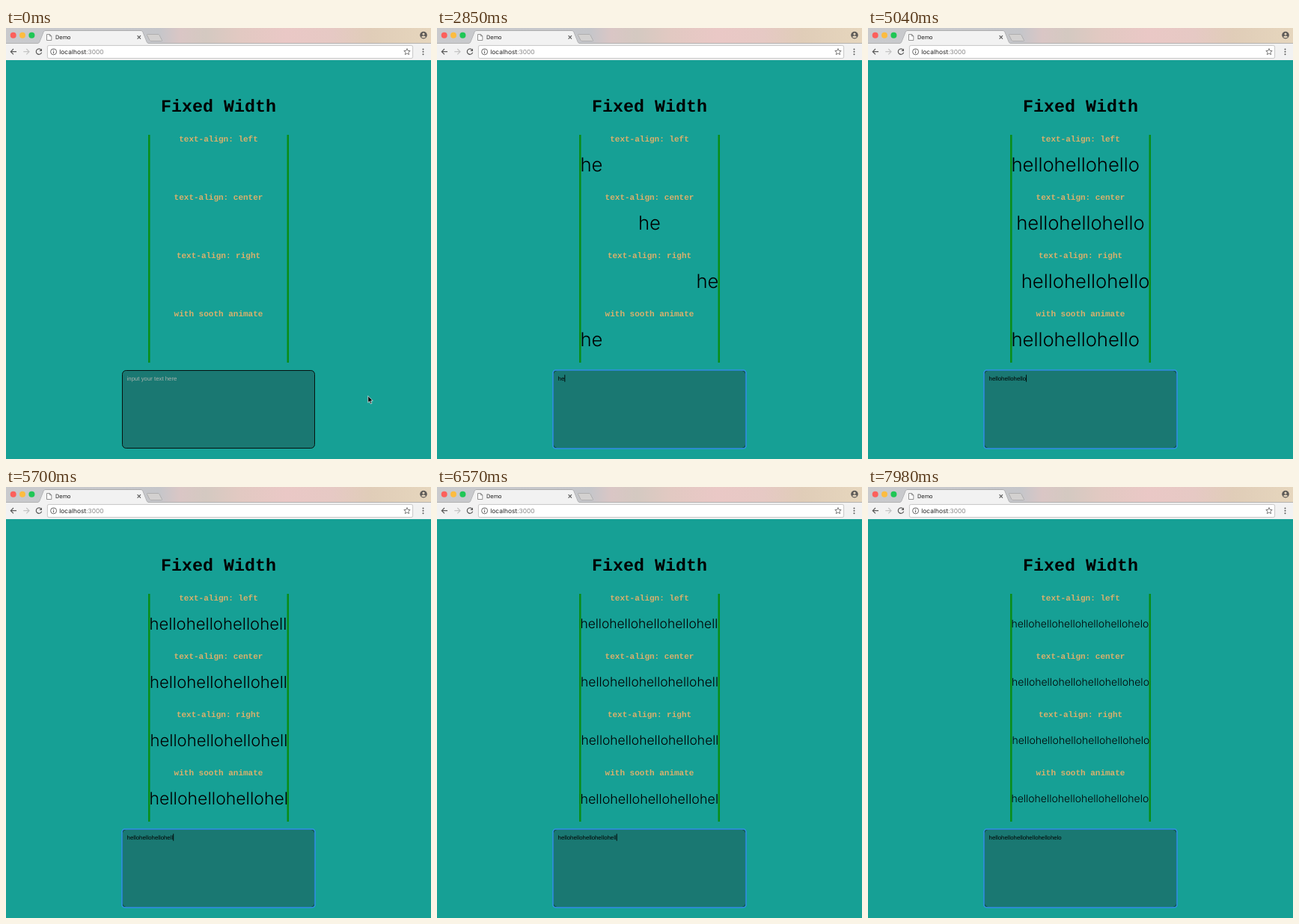
An HTML page for the animation above (8000 ms loop, 568 by 577 pixels).

```html
<!DOCTYPE html>
<html lang="en">
<head>
<meta charset="utf-8">
<title>Demo</title>
<style>
  html, body { margin: 0; width: 100%; height: 100%; overflow: hidden; background: #16a095; }
  svg { display: block; width: 568px; height: 577px; text-rendering: geometricPrecision; }
  .ui { font-family: Inter, Roboto, sans-serif; }
  .mono { font-family: "Liberation Mono", "DejaVu Sans Mono", monospace; font-weight: 700; text-anchor: middle; }
  .label { font-size: 11px; fill: #dab06c; }
  .big { font-family: Inter, Lato, sans-serif; font-weight: 300; }
  .area { font: 7.8px "Liberation Sans", Arial, sans-serif; }
  .icon { fill: none; stroke: #5b5b5b; stroke-width: 1.2; }
</style>
</head>
<body>
<svg viewBox="0 0 568 577">
  <defs>
    <linearGradient id="bar">
      <stop offset="0" stop-color="#c9cacd"/>
      <stop offset=".36" stop-color="#c5c6ca"/>
      <stop offset=".41" stop-color="#dac6c5"/>
      <stop offset=".47" stop-color="#d4c9c1"/>
      <stop offset=".55" stop-color="#e2c9c2"/>
      <stop offset=".66" stop-color="#eac8c6"/>
      <stop offset=".77" stop-color="#e6c9c4"/>
      <stop offset=".86" stop-color="#e0cdb8"/>
      <stop offset="1" stop-color="#e6d6bd"/>
    </linearGradient>
    <clipPath id="column"><rect x="192" y="140" width="184.5" height="310"/></clipPath>
  </defs>

  <!-- browser frame -->
  <rect width="568" height="21" fill="url(#bar)"/>
  <circle cx="9.7" cy="9.8" r="4" fill="#fc605c"/>
  <circle cx="22" cy="9.8" r="4" fill="#fdbc40"/>
  <circle cx="34.4" cy="9.8" r="4" fill="#1fc655"/>
  <path d="M188.5 9.5Q188 8.5 189.5 8.5H203Q204.5 8.5 205 9.5L208.5 16.5Q209 17.5 207.5 17.5H194Q192.5 17.5 192 16.5Z" fill="#d3d1d0" stroke="#a9a7a7" stroke-width=".8"/>
  <rect y="20.5" width="568" height="22.5" fill="#f2f2f2"/>
  <path d="M0 20.5H43Q44.5 20 45.3 18L50.4 5Q51.2 3.5 53 3.5H180Q181.8 3.5 182.6 5L187.7 18Q188.5 20 190 20.5H568" fill="none" stroke="#a8a8a8" stroke-width=".8"/>
  <path d="M43 21Q44.5 20.4 45.5 18.3L50.7 5.2Q51.4 3.9 53 3.9H180Q181.6 3.9 182.3 5.2L187.5 18.3Q188.5 20.4 190 21Z" fill="#f2f2f2"/>
  <path d="M54.5 8.5H58.5L60.8 10.8V16.5H54.5ZM58.5 8.5V10.8H60.8" fill="#fff" stroke="#777" stroke-width=".8"/>
  <text class="ui" x="66" y="15" font-size="7.4" fill="#222">Demo</text>
  <path class="icon" d="M175.6 10.2L180 14.6M180 10.2L175.6 14.6"/>
  <circle cx="558" cy="9.6" r="4.8" fill="#5d5a57"/>
  <circle cx="558" cy="8" r="1.6" fill="#e6d6bd"/>
  <path d="M554.9 11.9Q558 9.3 561.1 11.9Q558 14.4 554.9 11.9Z" fill="#e6d6bd"/>

  <path class="icon" d="M14 31.7H6.5M10 28L6.3 31.7L10 35.4"/>
  <path class="icon" style="stroke:#c4c4c4" d="M23.3 31.7H30.8M27.3 28L31 31.7L27.3 35.4"/>
  <path class="icon" d="M47 29.4A3.7 3.7 0 1 0 47.6 32.6"/>
  <path d="M48 27.4V31H44.4Z" fill="#5b5b5b"/>
  <rect x="55.4" y="23.4" width="488.2" height="17.2" rx="2" fill="#fff" stroke="#b9b9b9" stroke-width=".8"/>
  <circle class="icon" style="stroke-width:.9" cx="63.6" cy="31.8" r="4"/>
  <path class="icon" style="stroke-width:1" d="M63.6 31.2V34.2M63.6 29.2V30.2"/>
  <text class="ui" x="71.3" y="34.9" font-size="8.4" fill="#222">localhost<tspan fill="#868686">:3000</tspan></text>
  <path class="icon" style="stroke-width:.8" d="M536 27.5L537.2 30.4L540.2 30.6L537.9 32.6L538.6 35.6L536 34L533.4 35.6L534.1 32.6L531.8 30.6L534.8 30.4Z"/>
  <g fill="#5b5b5b">
    <circle cx="557.5" cy="28.4" r="1"/><circle cx="557.5" cy="31.8" r="1"/><circle cx="557.5" cy="35.2" r="1"/>
  </g>

  <!-- page -->
  <rect y="43" width="568" height="534" fill="#16a095"/>
  <text class="mono" x="284" y="112.2" font-size="23.3">Fixed Width</text>
  <path d="M191.3 143V448M376.8 143V448" stroke="#0a8d16" stroke-width="2.5"/>
  <g id="rows"></g>

  <rect x="155.5" y="458.5" width="257" height="104" rx="5" fill="#1a7872" stroke="#06110f"/>
  <rect id="ring" x="155" y="458" width="258" height="105" rx="4" fill="none" stroke="#2f92dd" stroke-opacity=".88" stroke-width="2.1"/>
  <text id="hint" class="area" x="161.6" y="471.8" fill="#a9b3ae">input your text here</text>
  <text id="typed" class="area" x="161.6" y="471.8"></text>
  <rect id="caret" y="464.3" width=".9" height="9.4"/>

  <path id="arrow" d="M0 0V9L2.1 7.2L3.6 10.6L5.2 9.9L3.7 6.6H6.5Z" fill="#000" stroke="#fff" stroke-width=".7"/>
  <path id="beam" d="M-2 -5.5Q0 -5.5 0 -4V4Q0 5.5 -2 5.5M2 -5.5Q0 -5.5 0 -4V4Q0 5.5 2 5.5" fill="none" stroke="#111" stroke-width=".9"/>
</svg>
<script>
const LOOP = 8000, BASE = 25.7, LEFT = 192, WIDTH = 184, GLIDE = 200;
const FULL = "hello".repeat(5) + "helo";
const KEYS = [
  2430, 2850, 3000, 3150, 3330,
  3540, 3690, 3810, 3930, 4110,
  4350, 4500, 4650, 4800, 5010,
  5250, 5400, 5520, 5640, 5880,
  6090, 6240, 6390, 6510, 6720,
  6930, 7110, 7320, 7470
];
const FOCUS = 1110;
// time, x, y of the pointer
const PATH = [[90, 483.8, 492.5], [570, 351.5, 487], [720, 351.5, 487], [810, 347, 485],
  [1320, 347, 485], [1650, 336, 469]];
const ROWS = [["text-align: left", "start"], ["text-align: center", "middle"],
  ["text-align: right", "end"], ["with sooth animate", "start"]];
const EDGE = { start: LEFT - .6, middle: LEFT + WIDTH / 2, end: LEFT + WIDTH + .4 };

const $ = id => document.getElementById(id);
const show = (el, on) => el.setAttribute("visibility", on ? "visible" : "hidden");
const smooth = p => p * p * (3 - 2 * p);
const clamp = p => Math.max(0, Math.min(1, p));

function add(attrs, text = "") {
  const el = document.createElementNS("http://www.w3.org/2000/svg", "text");
  for (const k in attrs) el.setAttribute(k, attrs[k]);
  el.textContent = text;
  return $("rows").appendChild(el);
}

const lines = ROWS.map(([name, anchor], i) => {
  add({ class: "mono label", x: 284, y: 151.8 + i * 78 }, name);
  return add({ class: "big", x: EDGE[anchor], "text-anchor": anchor, "clip-path": "url(#column)" });
});

const pen = document.createElement("canvas").getContext("2d");
function measure(font, text) {
  pen.font = font;
  return pen.measureText(text).width / 100;
}

// font size that makes the first n letters fit the column
const fits = [BASE];
for (let n = 1; n <= FULL.length; n++) {
  fits.push(Math.min(BASE, WIDTH / measure("300 100px Inter, Lato, sans-serif", FULL.slice(0, n))));
}

// each key press starts a new glide from the size reached so far
function glide(t) {
  let size = BASE;
  for (let i = 0; i < KEYS.length && KEYS[i] <= t; i++) {
    const end = Math.min(t, KEYS[i + 1] ?? LOOP);
    size += (fits[i + 1] - size) * smooth(clamp((end - KEYS[i]) / GLIDE));
  }
  return size;
}

function pointer(t) {
  let [, x, y] = PATH[0];
  for (let i = 1; i < PATH.length; i++) {
    const [t0, x0, y0] = PATH[i - 1], [t1, x1, y1] = PATH[i];
    if (t < t0) break;
    const p = smooth(clamp((t - t0) / (t1 - t0)));
    x = x0 + (x1 - x0) * p;
    y = y0 + (y1 - y0) * p;
  }
  return [x, y];
}

function caretOn(t, n) {
  if (t < FOCUS) return false;
  if (!n) return t < 1510 || t >= 2010;
  return t - KEYS[n - 1] < 500;
}

function draw(t) {
  const n = KEYS.filter(k => k <= t).length;
  const text = FULL.slice(0, n);
  lines.forEach((el, i) => {
    const size = i == 3 ? glide(t) : fits[n];
    if (el.textContent != text) el.textContent = text;
    el.setAttribute("font-size", size);
    el.setAttribute("y", 183 + i * 78 + size * .363);
  });

  $("typed").textContent = text;
  show($("hint"), !n);
  show($("ring"), t >= FOCUS);
  show($("caret"), caretOn(t, n));
  $("caret").setAttribute("x", 161.7 + 7.8 * measure('100px "Liberation Sans", Arial, sans-serif', text));

  const [x, y] = pointer(t), inside = x < 413;
  for (const id of ["arrow", "beam"]) $(id).setAttribute("transform", `translate(${x} ${y})`);
  show($("arrow"), !n && !inside);
  show($("beam"), !n && inside);
}

const start = performance.now();
function tick() {
  draw((performance.now() - start) % LOOP);
  requestAnimationFrame(tick);
}
tick();
</script>
</body>
</html>
```
